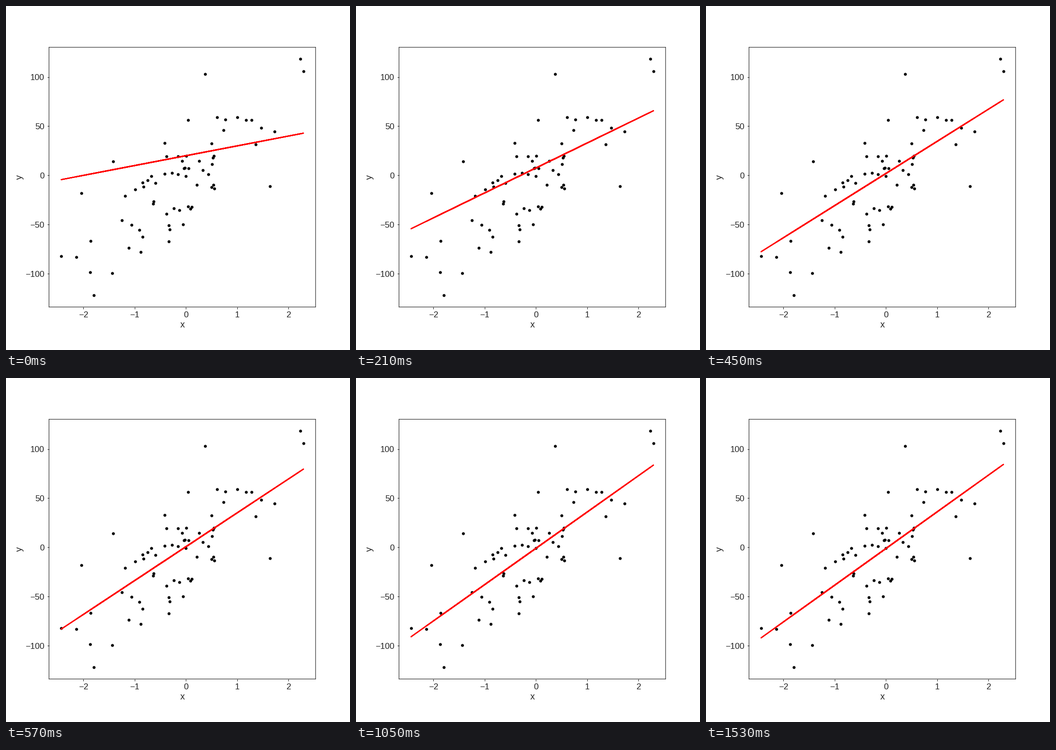
A matplotlib script that plays this animation: 748 px wide and 748 px high, repeating every 1560 ms.

```python
import numpy as np
import matplotlib.pyplot as plt
from matplotlib.animation import FuncAnimation

SIZE, DPI = 748, 110
FRAMES, INTERVAL = 52, 30
SAMPLES, NOISE = 70, 30
RATE = 0.1
INK = "#262626"


def pt(px):
    """Pixels to points."""
    return px * 72 / DPI


def make_samples(seed):
    """Normal x values and a noisy line through the origin."""
    rng = np.random.RandomState(seed)
    x = rng.standard_normal(SAMPLES)
    slope = 100 * rng.uniform()
    return x, slope * x + rng.normal(scale=NOISE, size=SAMPLES)


def descend(slope, bias, steps):
    """Line parameters at every step of gradient descent."""
    path = []
    for _ in range(steps):
        path.append((slope, bias))
        error = slope * x + bias - y
        slope -= RATE * np.mean(error * x)
        bias -= RATE * np.mean(error)
    return path


x, y = make_samples(2)
path = descend(10, 20, FRAMES)

plt.rcParams["font.family"] = "Liberation Sans"
fig = plt.figure(figsize=(SIZE / DPI, SIZE / DPI), dpi=DPI, facecolor="white")
ax = fig.add_axes([0.125, 0.125, 0.775, 0.755])
ax.margins(0.05)
ax.scatter(x, y, s=pt(6.4) ** 2, color="black", linewidths=0)
line, = ax.plot(x, 0 * x, color="red", linewidth=pt(2.5),
                solid_capstyle="round", solid_joinstyle="round")

ax.set(xticks=range(-2, 3), yticks=range(-100, 101, 50))
ax.tick_params(length=pt(4.3), width=pt(1.2), pad=pt(5.5), color=INK,
               labelcolor=INK, labelsize=12)
for spine in ax.spines.values():
    spine.set(color=INK, linewidth=pt(1.2), snap=False)

label = dict(fontsize=13, color=INK, ha="center", va="baseline",
             rotation_mode="anchor")
fig.text(383.4 / SIZE, 1 - 699 / SIZE, "x", **label)
fig.text(35 / SIZE, 1 - 372 / SIZE, "y", rotation=90, **label)


def update(i):
    slope, bias = path[i]
    line.set_ydata(slope * x + bias)
    return line,


anim = FuncAnimation(fig, update, frames=FRAMES, interval=INTERVAL,
                     repeat=True, repeat_delay=0)
plt.show()
```
